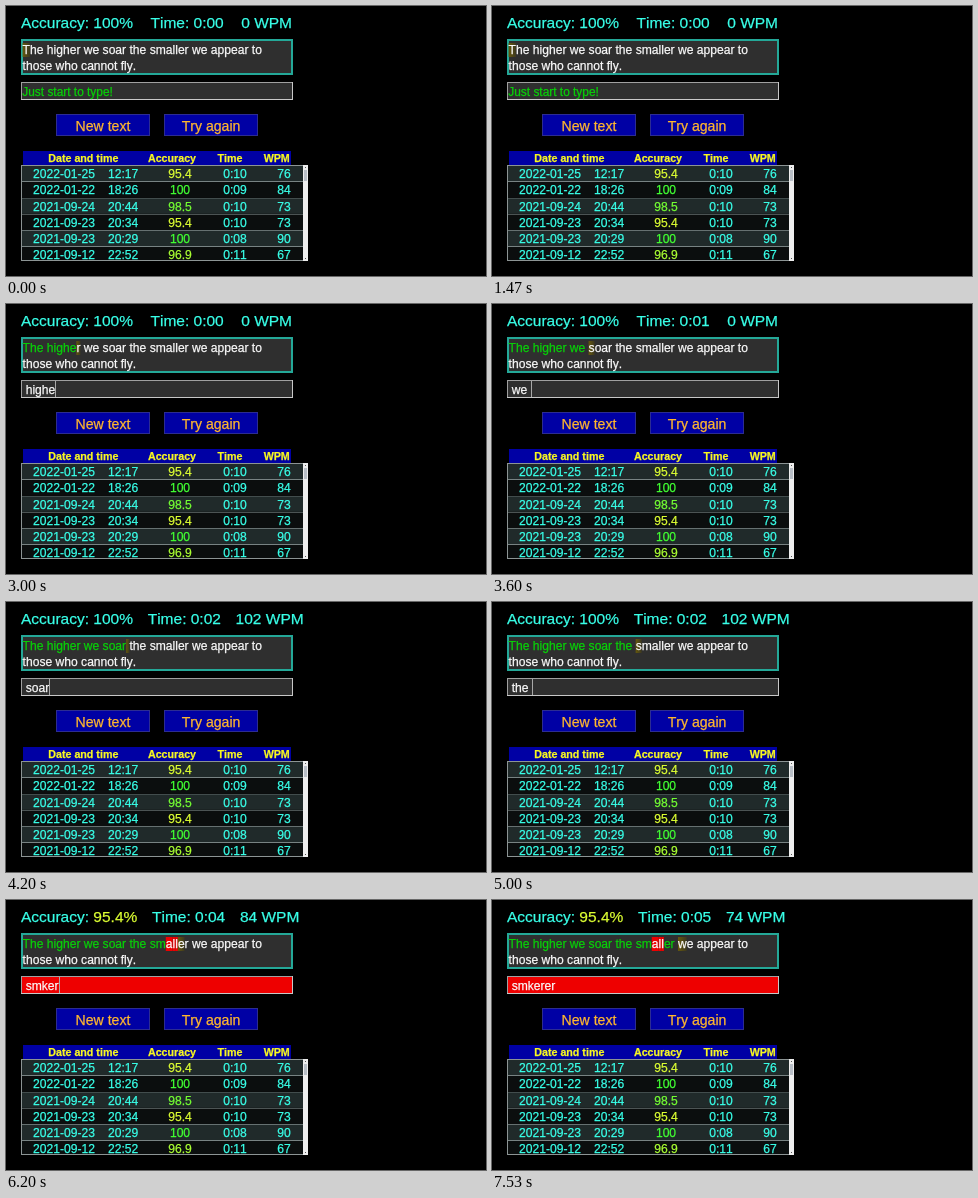
An HTML page with a canvas for the animation above (8000 ms loop, 480 px wide and 270 px high).

```html
<!DOCTYPE html>
<html lang="en">
<head>
<meta charset="utf-8">
<title>Typing test</title>
<style>
  html, body { margin: 0; width: 100%; height: 100%; overflow: hidden; background: #000; }
  canvas { display: block; width: 480px; height: 270px; }
</style>
</head>
<body>
<canvas id="stage" width="480" height="270"></canvas>
<script>
const ctx = document.getElementById('stage').getContext('2d');
const FAMILY = '"Liberation Sans", Arial, sans-serif';
const LOOP = 8000;
const BLINK = 450;
const CYAN = '#38ffe8', GREEN = '#08d008', WHITE = '#fafafa', PANEL = '#2f2f2f', RED = '#ee0000';

const LINES = ['The higher we soar the smaller we appear to', 'those who cannot fly.'];
const GOAL = LINES.join(' ');
const TYPED = 'The higher we soar the smkerer ';
const KEYS = [
  2000, 2130, 2270, 2400,
  2530, 2650, 2730, 2870, 3000, 3130, 3200,
  3330, 3470, 3600,
  3730, 3870, 4000, 4200, 4400,
  4600, 4730, 4870, 5000,
  5070, 5200, 5600, 5760, 5930, 6730, 6870, 7070
];
const CLOCK_START = 2150;

const ROWS = [
  ['2022-01-25', '12:17', 95.4, '0:10', 76],
  ['2022-01-22', '18:26', 100, '0:09', 84],
  ['2021-09-24', '20:44', 98.5, '0:10', 73],
  ['2021-09-23', '20:34', 95.4, '0:10', 73],
  ['2021-09-23', '20:29', 100, '0:08', 90],
  ['2021-09-12', '22:52', 96.9, '0:11', 67]
];

function rect(x, y, w, h, color) {
  ctx.fillStyle = color;
  ctx.fillRect(x, y, w, h);
}

// The lower right edges may take a lighter colour for a sunken look.
function frame(x, y, w, h, line, color, fill, light = color) {
  rect(x, y, w, h, light);
  rect(x, y, w - line, h - line, color);
  rect(x + line, y + line, w - 2 * line, h - 2 * line, fill);
}

function setFont(size, weight = '') {
  ctx.font = `${weight} ${size}px ${FAMILY}`;
  ctx.fontKerning = 'none';
}

// A hairline stroke gives the letters a little more weight.
function text(str, x, y, color, align = 'left') {
  ctx.textAlign = align;
  ctx.fillStyle = ctx.strokeStyle = color;
  ctx.lineWidth = 0.25;
  ctx.lineJoin = 'round';
  ctx.fillText(str, x, y);
  ctx.strokeText(str, x, y);
}

const width = str => ctx.measureText(str).width;
const keysAt = t => KEYS.filter(k => k <= t).length;
const isWrong = i => TYPED[i] !== GOAL[i];

// Yellow at 95 percent, turning green towards 100.
const scoreColor = p => `hsl(${Math.min(120, 66 + (p - 95) * 10)}, 100%, 60%)`;

// Figures refresh once a second while the clock runs.
function stats(t) {
  const sec = Math.max(0, Math.floor((t - CLOCK_START) / 1000));
  const count = keysAt(CLOCK_START + sec * 1000);
  let errors = 0;
  for (let i = 0; i < count; i++) if (isWrong(i)) errors++;
  return {
    sec,
    wpm: sec > 1 ? Math.round(count * 12 / sec) : 0,
    accuracy: errors ? (100 * (1 - errors / GOAL.length)).toFixed(1) : '100'
  };
}

function drawHeader(t) {
  const { sec, wpm, accuracy } = stats(t);
  const speed = wpm + ' WPM';
  const label = 'Accuracy: ';
  const clock = 'Time: 0:0' + sec;
  setFont(15.5);
  const gap = wpm ? 14.7 : 17.5;
  const clockX = 15 + width(label + accuracy + '%') + gap;
  text(label, 15, 22, CYAN);
  text(accuracy + '%', 15 + width(label), 22, accuracy === '100' ? CYAN : scoreColor(+accuracy));
  text(clock, clockX, 22, CYAN);
  text(speed, clockX + width(clock) + gap, 22, CYAN);
}

function drawGoal(n) {
  frame(15, 33, 272, 36, 2, '#24a898', PANEL);
  setFont(12.1);
  const [first, second] = LINES;
  for (let i = 0; i < first.length; i++) {
    const x = 16.6 + width(first.slice(0, i));
    const w = width(first[i]);
    const wrong = i < n && isWrong(i);
    if (wrong) rect(x, 37, w, 14, RED);
    if (i === n) {
      const glow = ctx.createLinearGradient(x, 0, x + w, 0);
      glow.addColorStop(0, '#66580c');
      glow.addColorStop(1, '#3c3820');
      rect(x, 37, w, 14, glow);
    }
    text(first[i], x, 48, i < n && !wrong ? GREEN : WHITE);
  }
  text(second, 16.6, 64, WHITE);
}

function drawField(t, n) {
  const from = Math.max(0, TYPED.lastIndexOf(' ', n - 2));
  let bad = false;
  for (let i = from; i < n; i++) bad = bad || isWrong(i);
  frame(15, 76, 272, 18, 1, '#a0a0a0', bad ? RED : PANEL, '#c8c8c8');

  const str = n ? TYPED.slice(from, n) : 'Just start to type!';
  setFont(n ? 12.1 : 11.9);
  text(str, 16.3, 89.5, n ? WHITE : GREEN);

  const caret = n
    ? (t - KEYS[n - 1]) % (2 * BLINK) < BLINK
    : (t >= 70 && t < 400) || (t >= 1000 && t < 1470);
  if (caret) rect(Math.round(16.5 + width(str)), 77, 1, 16, '#a8a8a8');
}

function drawButton(x, label) {
  frame(x, 108, 94, 22, 1, '#2c2c92', '#0000a4');
  setFont(14.1);
  text(label, x + 47, 124.5, '#ffb62e', 'center');
}

function drawTable() {
  rect(17, 145, 268, 14, '#0000a4');
  setFont(10.7, 'bold');
  [['Date and time', 77.3], ['Accuracy', 166], ['Time', 224], ['WPM', 270.7]]
    .forEach(([label, x]) => text(label, x, 156, '#f8f820', 'center'));

  frame(15, 159, 287, 96, 1, '#8c9494', '#0a0a0a');
  ctx.save();
  ctx.beginPath();
  ctx.rect(16, 160, 281, 94);
  ctx.clip();
  setFont(12.1);
  ROWS.forEach(([date, hour, score, time, wpm], i) => {
    const y = 160 + i * 16.2;
    rect(16, y, 281, 15.4, i % 2 ? '#0b0e0e' : '#202a2a');
    rect(16, Math.round(y + 15.4), 281, 1, '#788383');
    const base = y + 12.2;
    text(date, 27, base, CYAN);
    text(hour, 102, base, CYAN);
    text(score, 174, base, scoreColor(score), 'center');
    text(time, 229, base, CYAN, 'center');
    text(wpm, 278, base, CYAN, 'center');
  });
  ctx.restore();

  rect(297, 159, 5, 96, '#eeeeee');
  rect(298, 164, 3, 11, '#b8bec6');
  rect(299, 161, 1, 1, '#555');
  rect(299, 252, 1, 1, '#555');
}

function draw(t) {
  const n = keysAt(t);
  rect(0, 0, 480, 270, '#000');
  drawHeader(t);
  drawGoal(n);
  drawField(t, n);
  drawButton(50, 'New text');
  drawButton(158, 'Try again');
  drawTable();
}

const start = performance.now();
function tick() {
  draw((performance.now() - start) % LOOP);
  requestAnimationFrame(tick);
}
tick();
</script>
</body>
</html>
```
